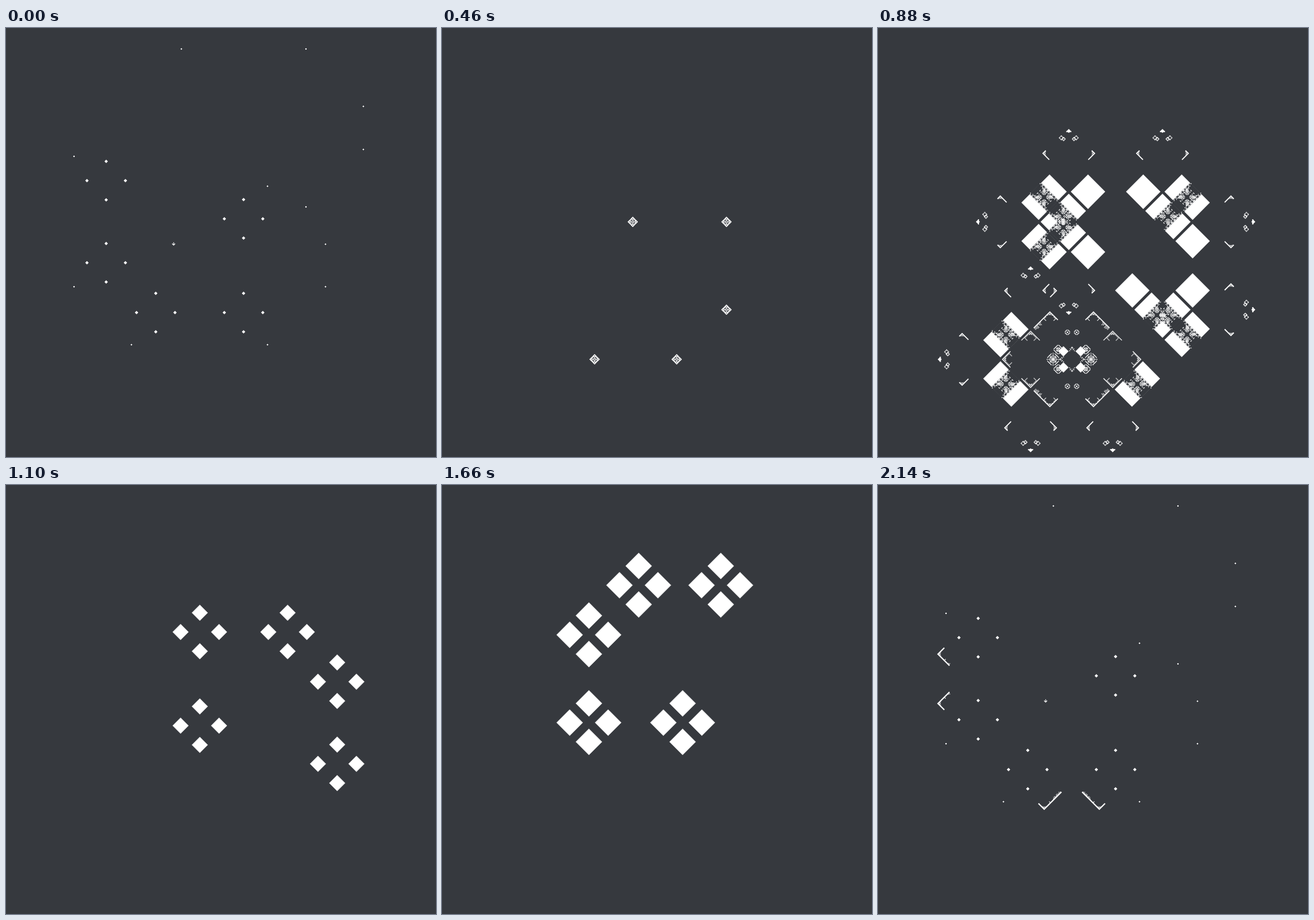
An HTML page with a canvas that plays this animation: 749 px wide and 747 px high, repeating every 2.16 s.

```html
<!DOCTYPE html>
<html>
<head>
<meta charset="utf-8">
<style>
html, body { margin: 0; height: 100%; overflow: hidden; background: #36393e; }
canvas { display: block; }
</style>
</head>
<body>
<canvas id="stage" width="749" height="747"></canvas>
<script>
const ctx = document.getElementById('stage').getContext('2d');
const BG = '#36393e', MID = 375.2, STEPS = 108, TURN = 26.77;
const SPEED = 7.36, ARM = 33.5, SQ2 = Math.SQRT2;
const SEEDED = 13.15, TWINNED = 11.95;
const DIRS = [[0, -1], [1, 0], [0, 1], [-1, 0]];

// Five clusters: centre, directions of surviving tips, directions of rings
const CLUSTERS = [
  { x: 174, y: 265.3, tips: [0, 1, 3], rings: [0, 1, 3] },
  { x: 174, y: 408.3, tips: [3], rings: [1, 2, 3] },
  { x: 260.4, y: 495, tips: [2], rings: [0, 2, 3] },
  { x: 413.3, y: 495, tips: [1, 2], rings: [1, 2] },
  { x: 413.3, y: 331.8, tips: [0, 1, 3], rings: [0, 1, 3] }
];
const TWINS = [[174, 312, 0], [174, 363, 2]];
const HITS = [[174, 337, 4.8], [337, 495, 5.5], [413.3, 413.4, 6.2]];
const DEBRIS = [[305, 36], [522, 36], [622, 136], [622, 211], [118, 223], [455, 275],
  [522, 311], [556, 376], [556, 450], [118, 450], [218, 551], [455, 551]];

const hash = (a, b) => { const n = Math.sin(a * 12.9 + b * 78.2) * 43758.5; return n - Math.floor(n); };

function key(s, points) {
  let [t0, v0] = points[0];
  for (const [t, v] of points) {
    if (s <= t) return t === t0 ? v : v0 + (v - v0) * (s - t0) / (t - t0);
    [t0, v0] = [t, v];
  }
  return v0;
}

function at(x, y, angle, draw) {
  ctx.save();
  ctx.translate(x, y);
  ctx.rotate(angle);
  draw();
  ctx.restore();
}

function outline(x, y, r) {
  ctx.beginPath();
  ctx.moveTo(x, y - r);
  ctx.lineTo(x + r, y);
  ctx.lineTo(x, y + r);
  ctx.lineTo(x - r, y);
  ctx.closePath();
}

function diamond(x, y, r, color = '#fff', fringe) {
  if (r <= 0) return;
  outline(x, y, r);
  ctx.fillStyle = color;
  ctx.fill();
  if (fringe) {
    ctx.lineWidth = 1;
    ctx.strokeStyle = 'rgba(255,255,255,.45)';
    ctx.stroke();
  }
}

// Mirrored grains between two nested diamonds, given by half side
function speckle(x, y, outer, inner, density = 0.5, round) {
  if (outer <= 0) return;
  at(x, y, Math.PI / 4, () => {
    ctx.fillStyle = '#fff';
    const cell = 1.5, n = Math.floor(outer / cell), rest = outer - n * cell;
    for (let i = 0; i <= n; i++) for (let j = 0; j <= n; j++) {
      const far = Math.max(i, j), near = Math.min(i, j);
      if (far * cell + rest < inner || hash(n - far, near) > density) continue;
      if (round && (near < 1 || Math.hypot(i, j) > n + 0.5)) continue;
      const u = i * cell + rest, v = j * cell + rest;
      for (const a of [-u, u]) for (const b of [-v, v])
        ctx.fillRect(a - 0.7, b - 0.7, 1.4, 1.4);
    }
  });
}

// A corner with its point at x, y; bumps grow on the inner side of its arms
function chevron(x, y, dir, left, right, width = 1.2, bumps = 0) {
  at(x, y, dir * Math.PI / 2, () => {
    ctx.beginPath();
    ctx.moveTo(-left, left);
    ctx.lineTo(0, 0);
    ctx.lineTo(right, right);
    ctx.lineWidth = width;
    ctx.strokeStyle = '#fff';
    ctx.stroke();
    if (!bumps) return;
    for (const [side, arm] of [[-1, left], [1, right]])
      for (let d = 2; d < arm; d += 1.5) {
        const tall = hash(d, 3) * bumps;
        for (let k = 1; k < tall; k++) ctx.fillRect(side * (d - k) - 0.6, d + k - 0.6, 1.2, 1.2);
      }
  });
}

function ring(x, y, r) {
  if (r <= 0) return;
  const h = r / SQ2, knob = Math.min(3.5, r / 3);
  outline(x, y, r - 0.5);
  ctx.lineWidth = 1.1;
  ctx.strokeStyle = '#fff';
  ctx.stroke();
  speckle(x, y, h - 1.5, Math.max(0, h - 5), 0.5);
  for (const [u, v] of DIRS) {
    diamond(x + u * (r - knob), y + v * (r - knob), knob);
    diamond(x + u * (r - knob), y + v * (r - knob), knob / 3, BG);
  }
}

function dashedRing(x, y, r) {
  const unit = (r - 2) * SQ2 / 38;
  ctx.save();
  ctx.setLineDash([4, 6, 7, 4, 7, 6, 4, 0].map(n => n * unit));
  outline(x, y, r - 2);
  ctx.lineWidth = 2.6;
  ctx.strokeStyle = '#fff';
  ctx.stroke();
  ctx.restore();
}

// A tip moving upwards in its own frame
function tip(s) {
  const top = -ARM - 3 - 7.3 * s;
  ctx.fillStyle = '#fff';
  if (s < 9) {
    const q = key(s, [[4.15, 33.5], [6.23, 25], [9, 18]]);
    const a = key(s, [[4.15, 33.5], [6.23, 32], [9, 20]]);
    diamond(0, top + q, q);
    speckle(0, top + q + 4, q / SQ2 + 1, q / SQ2 - 2);
    chevron(0, top, 0, a, a);
    for (const k of [-1, 1]) speckle(k * (a - 3), top + a - 1, 3, 0, 0.6);
  } else if (s < 13) {
    const a = key(s, [[9, 17], [11.46, 13], [13, 15]]);
    ctx.beginPath();
    ctx.moveTo(0, top);
    ctx.lineTo(a, top + a);
    ctx.lineTo(a * 0.6, top + a * 0.8);
    ctx.lineTo(-a * 0.6, top + a * 0.8);
    ctx.lineTo(-a, top + a);
    ctx.fill();
    for (const k of [-1, 0, 1]) speckle(k * 6, top + a, 3, 0, 0.5);
    diamond(0, top + 32, 1.5, '#bbb');
  } else if (s < 16) {
    chevron(0, top, 0, 21, 21, 1.5, 3.5);
    for (const k of [-1, 1]) chevron(k * 18, top + 24, 0, k > 0 ? 3 : 0, k > 0 ? 0 : 3, 1.4);
  } else if (s < 18.7) {
    diamond(0, top + 4, 3.5);
    ctx.fillRect(-4.5, top + 4, 9, 2);
    for (const k of [-1, 1]) {
      speckle(k * 13, top + 16, 2.5, 0, 0.6);
      speckle(k * 9, top + 18, 2, 0, 0.5);
      chevron(k * 45, top + 43, k, k < 0 ? 11 : 5, k < 0 ? 5 : 11, 1.8, 3);
    }
  }
}

function bloom(s) {
  const r = 3 + SPEED * s;
  for (const c of CLUSTERS) for (const [u, v] of DIRS)
    diamond(c.x + u * ARM, c.y + v * ARM, r, '#fff', s > 1);
}

function collide(s) {
  for (const c of CLUSTERS) {
    DIRS.forEach((_, d) => {
      if (s < 8 || c.tips.includes(d)) at(c.x, c.y, d * Math.PI / 2, () => tip(s));
    });
    if (s > 8.8) continue;
    const h = (s - 4.15) * 8.7;
    speckle(c.x, c.y, h + 6, h, 0.55);
    for (let d = 0; d < 4; d++) at(c.x, c.y, d * Math.PI / 2, () => {
      ctx.beginPath();
      ctx.moveTo(-36, -22);
      ctx.lineTo(-22, -22);
      ctx.lineTo(-22, -36);
      ctx.lineWidth = 2;
      ctx.strokeStyle = '#fff';
      ctx.setLineDash([4, 1, 2, 1]);
      ctx.stroke();
      speckle(-25, -25, 3, 0, 0.4);
    });
  }
  if (s < 8) for (const [x, y, start] of HITS) {
    const r = (s - start) * 14;
    diamond(x, y, r, BG);
    speckle(x, y, r / SQ2, r / SQ2 - 4, 0.5);
  }
}

function ringStage(s) {
  for (const c of CLUSTERS) for (const d of c.rings) {
    const [u, v] = DIRS[d];
    ring(c.x + u * 52.5, c.y + v * 52.5, ARM - (SEEDED - s) * SPEED);
  }
  if (s > TWINNED) return;
  for (const [x, y] of TWINS) dashedRing(x, y, ARM - (TWINNED - s) * SPEED);
  diamond(174, 337.5, 1.5, '#bbb');
}

// Seeds of two clusters that fall on the same spot
const cancelled = (x, y) => Math.hypot(x - 217, y - 452) < 18;

function seed(x, y, s) {
  if (s < 17.8) return diamond(x, y, SPEED * (s - SEEDED), '#fff', s < 15);
  const left = ARM - (s - 17.8) * 9.5;
  diamond(x, y, left - 12);
  speckle(x, y, left / SQ2, left / SQ2 - 5, 0.45);
}

// Wear away the seam between two touching squares
function seam(x, y, angle, h, band) {
  at(x, y, angle, () => {
    ctx.fillStyle = BG;
    ctx.fillRect(-h - 0.5, -band, 2 * h + 1, 2 * band);
    ctx.fillStyle = '#fff';
    for (let i = 0; i < h; i += 1.5) for (let j = 0; j < 4; j++)
      if (hash(i, j) > 0.3 + j * 0.18) for (const a of [-i, i])
        for (const b of [-band + j * 1.5, band - j * 1.5 - 1.5]) ctx.fillRect(a, b, 1.4, 1.4);
  });
}

function seedStage(s) {
  const r = SPEED * (s - SEEDED), h = r / SQ2, band = (s - 15.8) * 9.8;
  CLUSTERS.forEach((c, g) => {
    const facing = y => g < 2 && (g ? y < c.y : y > c.y);
    for (const d of c.rings) {
      const [u, v] = DIRS[d];
      for (const k of [-1, 1]) {
        const x = c.x + u * 52.5 - v * ARM * k, y = c.y + v * 52.5 + u * ARM * k;
        if (cancelled(x, y)) continue;
        if (s < 16.2 || !facing(y) || d % 2 === 0) seed(x, y, s);
        else if (s < 19) {
          const long = (d === 1) === (g === 0);
          chevron(x + u * r, y, d, long ? 28 : 14, long ? 14 : 28, 1.6, 5);
        }
      }
      const x = c.x + u * 19, y = c.y + v * 19;
      if (s < 16.2 || g > 1) seed(x, y, s);
      else if (s < 19) {
        const arm = d % 2 ? 16 : 14;
        chevron(x + u * r, y + v * r, d, arm, arm, 1.4, 6);
      }
    }
    if (band <= 0 || s >= 17.8) return;

    const seams = [];
    for (const d of c.rings) {
      const e = (d + 1) % 4;
      if (!c.rings.includes(e)) continue;
      const u = DIRS[d][0] + DIRS[e][0], v = DIRS[d][1] + DIRS[e][1];
      for (const k of [43, 9.5]) {
        const x = c.x + u * k, y = c.y + v * k;
        if (!cancelled(x, y) && (k > 10 || g > 1)) seams.push([x, y, Math.atan2(v, u)]);
      }
    }
    for (const [x, y, angle] of seams) seam(x, y, angle, h, band);
    if (g > 1) diamond(c.x, c.y, band, BG);
    for (const [x, y] of seams) speckle(x, y, Math.min(band, 13), 1, 0.55, true);
  });
}

function twinStage(s) {
  if (s < 16.2) {
    for (const [x, y, d] of TWINS) for (let k = 0; k < 4; k++)
      if (k === d || k % 2) diamond(x + DIRS[k][0] * ARM, y + DIRS[k][1] * ARM, SPEED * (s - TWINNED));
    return;
  }
  if (s > 20) return;
  const x = 174, y = 337.5;
  for (const i of [-1, 1]) {
    speckle(x, y + i * 33, 9, 0, 0.5);
    for (const j of [-1, 1]) {
      diamond(x + i * 14, y + j * 15, 9);
      speckle(x + i * 17, y + j * 24, 6, 0, 0.5);
      speckle(x + i * 47, y + j * 8, 3.5, 0, 0.4);
    }
  }
  diamond(x, y, 20, BG);
  speckle(x, y, 15, 13, 0.5);
}

// Rings gathering at the coming centres, and what is left over
function prelude(s) {
  if (s < -0.41) for (const c of CLUSTERS) ring(c.x, c.y, ARM + SPEED * (s + 0.41));
  else if (s < 0) bloom(0);
  if (s > -2 && s < 0.1) {
    ctx.fillStyle = '#fff';
    for (const [x, y] of DEBRIS) {
      ctx.fillRect(x - 1.5, y - 0.5, 3, 1);
      ctx.fillRect(x - 0.5, y - 1.5, 1, 3);
    }
    ctx.fillRect(291, 372.5, 1, 5);
    chevron(291.5, 377.5, 2, 2.5, 2.5, 1.4);
  }
  if (s > -1.5 && s < -0.03) {
    chevron(104, 294, 3, 20, 11, 2.2, 3);
    chevron(104, 380, 3, 11, 20, 2.2, 3);
    chevron(289, 564, 2, 30, 10, 2.2, 3);
    chevron(385, 564, 2, 10, 30, 2.2, 3);
  }
}

function scene(phase, s) {
  at(MID + 0.5, MID + 0.5, -phase * Math.PI / 2, () => {
    ctx.translate(-MID, -MID);
    if (s < 0.1) prelude(s);
    if (s < 0) return;
    if (s < 4.15) return bloom(s);
    if (s >= 8.6 && s < SEEDED) ringStage(s);
    if (s >= TWINNED) twinStage(s);
    if (s >= SEEDED && s < 21.3) seedStage(s);
    if (s < 18.7) collide(s);
  });
}

const start = performance.now();

function frame() {
  const step = Math.floor((performance.now() - start) / 20) % STEPS;
  const phase = Math.min(3, Math.floor(step / TURN)), s = step - phase * TURN;
  ctx.fillStyle = BG;
  ctx.fillRect(0, 0, 749, 747);
  scene(phase, s);
  if (s > TURN - 5) scene(phase + 1, s - TURN);
  requestAnimationFrame(frame);
}
frame();
</script>
</body>
</html>
```
